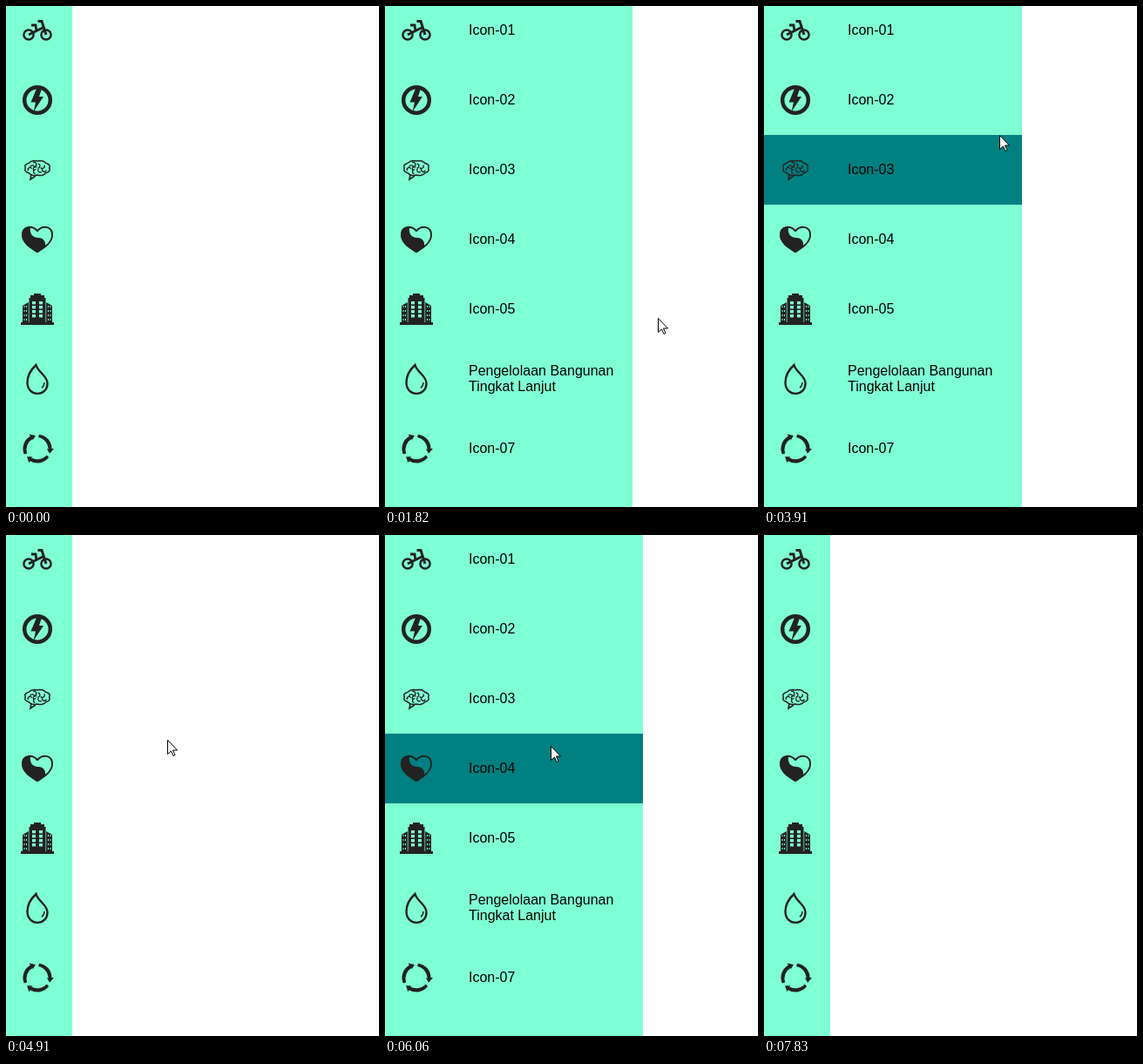
These frames come from a looping animation (428x575 px, 8.46 s). An HTML page with a canvas:

```html
<!DOCTYPE html>
<html lang="id">
<head>
<meta charset="utf-8">
<title>Sidebar</title>
<style>
  html, body { margin: 0; width: 100%; height: 100%; overflow: hidden; background: #fff; }
  canvas { display: block; }
</style>
</head>
<body>
<canvas id="stage" width="428" height="575"></canvas>
<script>
const ctx = document.getElementById('stage').getContext('2d', { alpha: false });
const LOOP = 8460, START = 350, STEP = 77.11, LAST = 97;
const NARROW = 76, WIDE = 296, ROW = 80, TOP = -12;
const MINT = '#7fffd4', TEAL = '#008080', INK = '#222';
const TAU = Math.PI * 2;
const LABELS = ['Icon-01', 'Icon-02', 'Icon-03', 'Icon-04', 'Icon-05',
  'Pengelolaan Bangunan Tingkat Lanjut', 'Icon-07'];

// Pointer moves in steps: rest first, then glide to (x, y)
const ENTRY = { x: 160, y: 560 };
const MOVES = [
  { x: 68, y: 350, glide: 4 },
  { x: 225, y: 347, glide: 6 },
  { x: 313, y: 358, glide: 3, rest: 6 },
  { x: 336, y: 363, glide: 2 },
  { x: 112, y: 122, glide: 5 },
  { x: 65, y: 118, glide: 3, rest: 3 },
  { x: 270, y: 148, glide: 6, rest: 8 },
  { x: 290, y: 182, glide: 6 },
  { x: 299, y: 200, glide: 2, rest: 1 },
  { x: 42, y: 278, glide: 9 },
  { x: 37, y: 64, glide: 4 },
  { x: 215, y: 272, glide: 7 },
  { x: 303, y: 314, glide: 6 },
  { x: 340, y: 317, glide: 4 },
  { x: 395, y: 580, glide: 7, rest: 5 }
];

// Steps at which the sidebar alternately opens and closes
const TOGGLES = [4, 18.82, 31.41, 55, 60.2, 80.69];
const TOGGLE_STEPS = 200 / STEP;

// CSS "ease": cubic-bezier(.25, .1, .25, 1), solved by bisection
function ease(x) {
  if (x >= 1) return 1;
  const bezier = (a, b, s) => 3 * a * s * (1 - s) ** 2 + 3 * b * s * s * (1 - s) + s ** 3;
  let s = 0.5;
  for (let d = 0.25; d > 1e-5; d /= 2) s += bezier(0.25, 0.25, s) < x ? d : -d;
  return bezier(0.1, 1, s);
}

function sidebarWidth(k) {
  let width = NARROW;
  TOGGLES.forEach((start, i) => {
    const goal = i % 2 ? NARROW : WIDE;
    if (k > start) width += (goal - width) * ease((k - start) / TOGGLE_STEPS);
  });
  return Math.round(width);
}

function pointerAt(k) {
  if (k < 0 || k >= LAST) return null;
  let from = ENTRY, left = k;
  for (const move of MOVES) {
    left -= move.rest || 0;
    if (left < move.glide) {
      const u = Math.max(0, left / move.glide);
      return {
        x: Math.round(from.x + (move.x - from.x) * u),
        y: Math.round(from.y + (move.y - from.y) * u)
      };
    }
    left -= move.glide;
    from = move;
  }
  return null;
}

function fill(shape, color = INK) {
  ctx.fillStyle = color;
  ctx.fill(new Path2D(shape));
}

function stroke(shape, width, color = INK) {
  ctx.strokeStyle = color;
  ctx.lineWidth = width;
  ctx.stroke(new Path2D(shape));
}

function arc(x, y, r, width, from = 0, span = TAU) {
  const path = new Path2D();
  path.arc(x, y, r, from, from + span);
  stroke(path, width);
}

function mirrored(paint) {
  for (const side of [-1, 1]) {
    ctx.save();
    ctx.scale(side, 1);
    paint();
    ctx.restore();
  }
}

function bike() {
  mirrored(() => arc(10, 5, 5.6, 2.5));
  stroke('M0.5 -10.5 H5 L10 5 M-10 5 L7 -3.5', 3);
  stroke('M-7 -6 H-2 L-1 1', 2.8);
}

function bolt() {
  arc(0, 0, 14.8, 4.5);
  fill('M-1 -13 H5 L2 -4 H7 L-4.5 13.5 L-2 2.5 H-7.5 Z');
}

function brain() {
  const outline = new Path2D();
  for (let a = 0; a < TAU; a += 0.1) {
    const r = 1 + 0.1 * Math.abs(Math.sin(4 * a));
    outline.lineTo(13.5 * r * Math.cos(a), 8 * r * Math.sin(a) - 2);
  }
  outline.closePath();
  stroke(outline, 1.5);
  stroke('M-7 5 L-8 11 L-2 7', 1.6);
  for (let i = 1; i < 10; i++) {
    const a = i * 2.4, r = Math.sqrt(i) / 4;
    arc(12 * r * Math.cos(a), 7 * r * Math.sin(a) - 2, 2.5, 1.3, a, 3);
  }
}

function heart() {
  const half = 'M0 -9.5 C4 -17 18 -16 17 -4 C16 5 6 10 0 14.5';
  mirrored(() => stroke(half, 1.9));
  ctx.scale(-1, 1);
  fill('M8 -14 C18 -16 19 -4 16 1 C13 8 6 11 0 14.5 L-9 9 C-10 2 -7 -2 -1 -2 C6 -2 9 -7 8 -14');
}

function building(back) {
  fill('M-19 18 V15 H19 V18 Z M-4 -18 H4 V-14 H-4 Z M-8 -16 H8 V-12 H-8 Z M-9.5 -13 H9.5 V16 H-9.5 Z');
  mirrored(() => {
    fill('M10.2 15 V-8 L17 -4 V15 Z');
    ctx.fillStyle = back;
    for (let y = -9; y < 10; y += 5) {
      ctx.fillRect(2, y, 4, 3.4);
      ctx.fillRect(12, y + 5, 1, 2);
      ctx.fillRect(14.5, y + 5, 1, 2);
    }
  });
}

function drop() {
  stroke('M-1.5 -16 C-7 -11 -11.5 -5 -11.5 4 C-11.5 21 11.5 21 11.5 5 C11.5 -4 1 -7 -1.5 -16 Z', 2.4);
  arc(0, 4, 8, 1.4, 0, 0.9);
}

function cycle() {
  for (let i = 0; i < 3; i++) {
    ctx.save();
    ctx.rotate((22 / 360 + i / 3) * TAU);
    ctx.beginPath();
    ctx.arc(0, 0, 16.5, -1.83, -0.38);
    ctx.lineTo(17.6, -7);
    ctx.lineTo(15.2, 0);
    ctx.lineTo(10, -4);
    ctx.arc(-1.3, 1.6, 14.3, -0.38, -1.75, true);
    ctx.fillStyle = INK;
    ctx.fill();
    ctx.restore();
  }
}

const ICONS = [bike, bolt, brain, heart, building, drop, cycle];

function wrap(text, room) {
  const lines = [];
  for (const word of text.split(' ')) {
    const joined = lines.length ? lines[lines.length - 1] + ' ' + word : word;
    if (lines.length && ctx.measureText(joined).width <= room) lines[lines.length - 1] = joined;
    else lines.push(word);
  }
  return lines;
}

function drawLabel(text, middle, width) {
  const lines = wrap(text, width - 116);
  ctx.fillStyle = '#000';
  lines.forEach((line, i) => ctx.fillText(line, 96, middle - lines.length * 9 + i * 18 + 14));
}

function drawPointer({ x, y }) {
  const arrow = 'M0 0 V16 L4 12.5 L6.5 18 L8.5 17 L6 11.5 H11 Z';
  ctx.save();
  ctx.translate(x + 0.5, y + 0.5);
  fill(arrow, '#fff');
  stroke(arrow, 1, '#000');
  ctx.restore();
}

function draw(k) {
  const width = sidebarWidth(k), pointer = pointerAt(k);
  const hovered = pointer && pointer.x < width ? Math.floor((pointer.y - TOP) / ROW) : -1;
  ctx.fillStyle = '#fff';
  ctx.fillRect(0, 0, 428, 575);
  ctx.save();
  ctx.beginPath();
  ctx.rect(0, 0, width, 575);
  ctx.clip();
  ctx.fillStyle = MINT;
  ctx.fillRect(0, 0, width, 575);
  ctx.font = '16px Arial, "Liberation Sans", sans-serif';
  LABELS.forEach((label, i) => {
    const y = TOP + i * ROW, back = i === hovered ? TEAL : MINT;
    ctx.fillStyle = back;
    ctx.fillRect(0, y, width, ROW);
    ctx.save();
    ctx.translate(36, y + ROW / 2);
    ICONS[i](back);
    ctx.restore();
    drawLabel(label, y + ROW / 2, width);
  });
  ctx.restore();
  if (pointer) drawPointer(pointer);
}

const begin = performance.now();
function tick() {
  const t = (performance.now() - begin) % LOOP;
  draw(Math.floor((t - START) / STEP + 0.05));
  requestAnimationFrame(tick);
}
tick();
</script>
</body>
</html>
```
